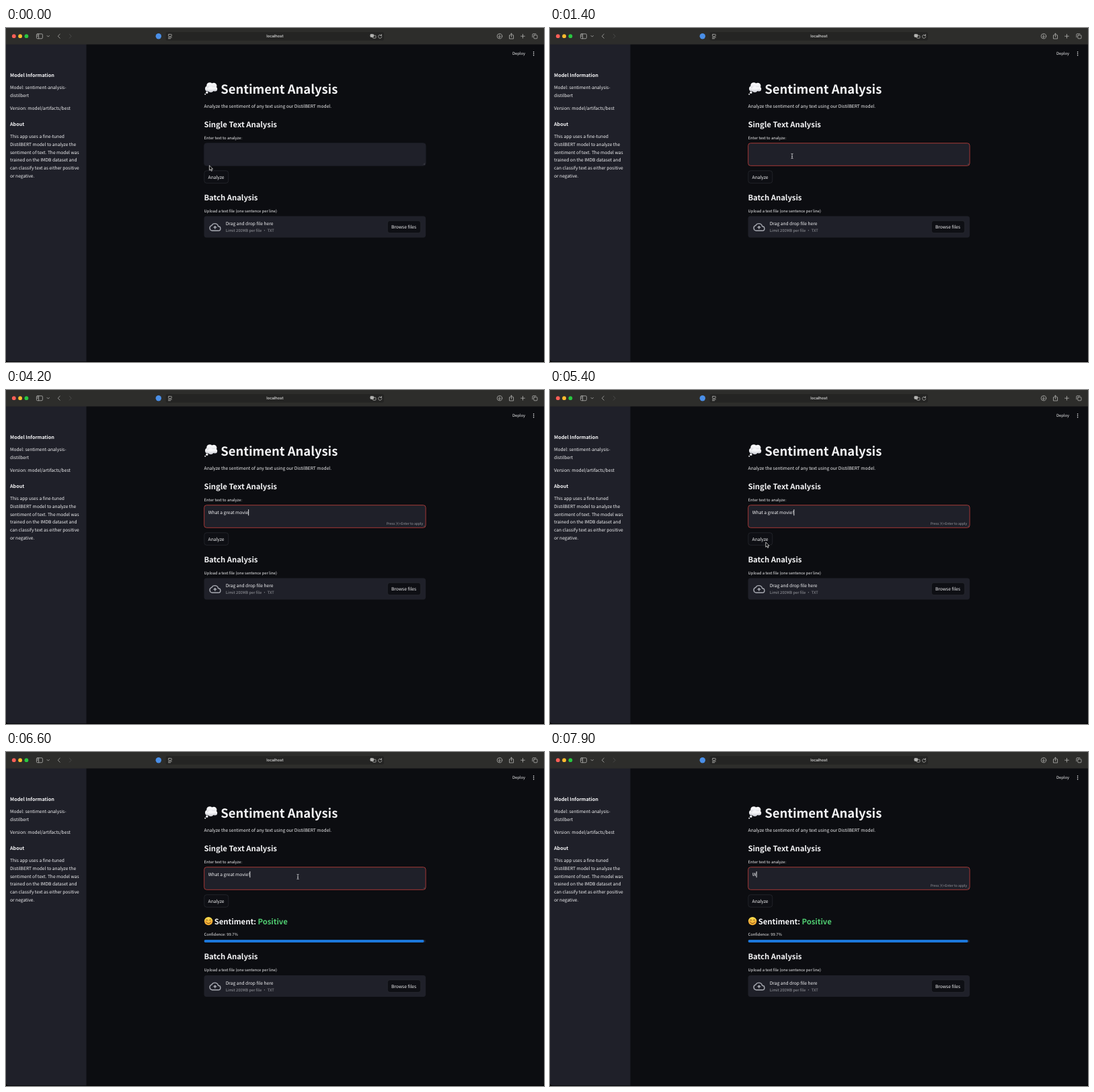
These frames come from a looping animation (800 px wide and 498 px high, 8000 ms). An HTML page:

```html
<!DOCTYPE html>
<html lang="en">
<head>
<meta charset="utf-8">
<title>Sentiment Analysis</title>
<style>
html, body { margin: 0; width: 100%; height: 100%; overflow: hidden; background: #000; }
svg { display: block; width: 800px; height: 498px; }
text {
  font: 6.66px "Noto Sans CJK SC", "Noto Sans CJK JP", "Open Sans", sans-serif;
  fill: #f4f4f6; text-rendering: geometricPrecision; white-space: pre;
}
.h1 { font-size: 18.4px; font-weight: 700; }
.h2 { font-size: 11.27px; font-weight: 600; }
.h3 { font-size: 7.2px; font-weight: 600; }
.small { font-size: 5.82px; }
.dim { fill: #9c9da3; }
.hint { font-size: 5.05px; fill: #9c9da3; text-anchor: end; }
.url { font: 500 5.8px Inter, sans-serif; fill: #e6e6e5; text-anchor: middle; }
.panel { fill: #1f2029; }
.button { fill: #0e0f14; stroke: #303138; stroke-width: .6; }
.icons { fill: none; stroke: #b4b4b2; stroke-width: .8; stroke-linecap: round; stroke-linejoin: round; }
</style>
</head>
<body>
<svg viewBox="0 0 800 498">
  <defs>
    <linearGradient id="puff" x2="0" y2="1">
      <stop offset=".4" stop-color="#f6f6f8"/><stop offset="1" stop-color="#c9cad2"/>
    </linearGradient>
    <linearGradient id="face" x2="0" y2="1">
      <stop stop-color="#fde04f"/><stop offset="1" stop-color="#f3a52c"/>
    </linearGradient>
  </defs>

  <rect width="800" height="497.3" rx="4" fill="#0c0d11"/>
  <path class="panel" d="M0 24H119.5V497.3H4Q0 497.3 0 493.3Z"/>

  <!-- browser bar -->
  <rect width="800" height="24.5" fill="#2d2d2b"/>
  <circle cx="11.8" cy="12.2" r="2.9" fill="#fe5f57"/>
  <circle cx="21.1" cy="12.2" r="2.9" fill="#fdbb2e"/>
  <circle cx="30.4" cy="12.2" r="2.9" fill="#29c840"/>
  <rect x="237.5" y="6" width="324.5" height="12.8" rx="3" fill="#242423"/>
  <circle cx="226.8" cy="12.2" r="4.2" fill="#4a8fe8"/>
  <g class="icons">
    <rect x="45.4" y="8.8" width="9" height="7" rx="1.4"/>
    <path d="M48.6 8.8V15.8M46.6 10.7H47.4M46.6 12.3H47.4M61 11.4L62.7 13.1L64.4 11.4M80.2 9.2L77.2 12.2L80.2 15.2"/>
    <path d="M94.2 9.2L97.2 12.2L94.2 15.2" stroke="#50504e"/>
    <rect x="241.5" y="9.4" width="4.8" height="3" rx=".7"/>
    <path d="M241.4 14.1H246.4M241.4 15.8H244.6"/>
    <rect x="541.9" y="9.4" width="4.7" height="4" rx=".8" fill="#b4b4b2"/>
    <rect x="545.4" y="11.2" width="4.6" height="4" rx=".8"/>
    <path d="M558.3 11.2A2.6 2.6 0 1 0 558.8 13M558.5 9.5V11.4H556.6"/>
    <circle cx="734" cy="12.2" r="3.7"/>
    <path d="M734 10.2V14M732.4 12.6L734 14.2L735.6 12.6"/>
    <path d="M750 10.8H748.5V16H754.6V10.8H753.1M751.5 13.2V8.2M749.9 9.7L751.5 8.1L753.1 9.7"/>
    <path d="M765.6 12.2H771.4M768.5 9.3V15.1"/>
    <rect x="784.8" y="10.6" width="5.2" height="5.2" rx="1"/>
    <path d="M782.9 13.8V9.7Q782.9 8.7 783.9 8.7H788"/>
  </g>
  <text class="url" x="399.8" y="14.2">localhost</text>

  <!-- sidebar -->
  <text class="h3" x="6" y="72.9">Model Information</text>
  <text class="h3" x="6" y="145.9">About</text>
  <g id="sidebar"></g>

  <!-- page -->
  <text class="small" x="753" y="40.3">Deploy</text>
  <g fill="#f4f4f6">
    <circle cx="784.6" cy="35.8" r=".8"/><circle cx="784.6" cy="38.3" r=".8"/><circle cx="784.6" cy="40.8" r=".8"/>
  </g>
  <g fill="url(#puff)">
    <circle cx="300" cy="90.5" r="4"/><circle cx="303" cy="86" r="4.8"/><circle cx="309" cy="86.2" r="4.4"/>
    <circle cx="310.6" cy="91" r="3.6"/><circle cx="304.5" cy="91.4" r="4.6"/>
    <circle cx="298.8" cy="96.2" r="1.7"/><circle cx="296.2" cy="98.8" r="1"/>
  </g>
  <text class="h1" x="319.3" y="97.9">Sentiment Analysis</text>
  <text x="294.6" y="119">Analyze the sentiment of any text using our DistilBERT model.</text>
  <text class="h2" x="294.4" y="147.6">Single Text Analysis</text>
  <text class="small" x="294.6" y="165.6">Enter text to analyze:</text>

  <rect id="box" class="panel" x="294.7" y="171.7" width="329.4" height="33.6" rx="3.6" stroke-width=".9"/>
  <path d="M620.6 203.8L622.9 201.5M622.1 203.9L623 203" stroke="#77787d" stroke-width=".4"/>
  <text id="typed" x="300.8" y="185.1"></text>
  <rect id="caret" y="178" width=".9" height="9.2" fill="#f4f4f6"/>
  <text id="hint" class="hint" x="620.2" y="201.4">Press ⌘+Enter to apply</text>

  <rect class="button" x="294.8" y="212.8" width="35.9" height="18.5" rx="3.6"/>
  <text x="300.6" y="224.5">Analyze</text>

  <g id="result">
    <circle cx="301.1" cy="252.1" r="6.2" fill="url(#face)"/>
    <g fill="#f08a3c" opacity=".6"><circle cx="297.2" cy="253.4" r="1.4"/><circle cx="305" cy="253.4" r="1.4"/></g>
    <path d="M297.4 251Q298.7 248.9 300 251M302.2 251Q303.5 248.9 304.8 251M298 254Q301.1 257.6 304.2 254"
      fill="none" stroke="#70401a" stroke-width=".9" stroke-linecap="round"/>
    <text class="h2" x="309.8" y="256.8">Sentiment: <tspan fill="#4fcb70">Positive</tspan></text>
    <text class="small" x="294.6" y="274.2">Confidence: 99.7%</text>
    <rect class="panel" x="294.6" y="280.1" width="329.5" height="3.8" rx="1.9"/>
    <rect x="294.6" y="280.1" width="327" height="3.8" rx="1.9" fill="#1c78dc"/>
  </g>

  <g id="batch">
    <text class="h2" x="294.4" y="256.8">Batch Analysis</text>
    <text class="small" x="294.6" y="274.9">Upload a text file (one sentence per line)</text>
    <rect class="panel" x="294.5" y="280.6" width="329.6" height="31.8" rx="3.6"/>
    <path d="M306.4 302.2A4 4 0 0 1 305.9 294.4A5.2 5.2 0 0 1 315.6 295.8A3.2 3.2 0 0 1 315.8 302.2Z
      M310.8 299.8V296M308.7 297.8L310.8 295.7L312.9 297.8"
      fill="none" stroke="#a9abb3" stroke-width="1.4" stroke-linejoin="round"/>
    <text x="326.7" y="294">Drag and drop file here</text>
    <text class="small dim" x="326.7" y="304.2">Limit 200MB per file • TXT</text>
    <rect class="button" x="567.3" y="287.3" width="49.4" height="18.5" rx="3.6"/>
    <text x="572.9" y="299">Browse files</text>
  </g>

  <g id="pointer">
    <path id="arrow" d="M0 0V7.2L1.7 5.7L2.9 8.3L4.1 7.8L3 5.2H5.2Z" fill="#000" stroke="#fff" stroke-width=".7"/>
    <path id="beam" d="M-1.5 -3.6Q0 -3.6 0 -2.8Q0 -3.6 1.5 -3.6M0 -2.8V2.8M-1.5 3.6Q0 3.6 0 2.8Q0 3.6 1.5 3.6M-.8 .8H.8"
      fill="none" stroke="#d8d8dc" stroke-width=".8"/>
  </g>
</svg>

<script>
const LOOP = 8000;
const MESSAGE = "What a great movie!";
const CLICK = 5500, RESULT = 5850, REFOCUS = 6500, RETYPE = 7650;

const $ = id => document.getElementById(id);
const show = (id, on) => $(id).setAttribute("visibility", on ? "inherit" : "hidden");
const between = (t, a, b) => t >= a && t < b;

const sidebarLines = [
  [91.3, "Model: sentiment-analysis-"], [103, "distilbert"], [122, "Version: model/artifacts/best"],
  ...["This app uses a fine-tuned", "DistilBERT model to analyze the", "sentiment of text. The model was",
    "trained on the IMDB dataset and", "can classify text as either positive", "or negative."]
    .map((line, i) => [164.3 + i * 11.68, line])
];
$("sidebar").innerHTML = sidebarLines.map(([y, s]) => `<text x="6" y="${y}">${s}</text>`).join("");

// pointer stops: time, x, y
const stops = [
  [300, 302.4, 205], [1100, 360, 191], [4700, 360, 191],
  [5300, 320.8, 227], [5800, 320.8, 227], [6400, 434, 186]
];

function pointerAt(t) {
  const next = stops.findIndex(s => s[0] > t);
  if (next < 1) return stops.at(next).slice(1);
  const [t0, x0, y0] = stops[next - 1], [t1, x1, y1] = stops[next];
  const p = (t - t0) / (t1 - t0), e = p * p * (3 - 2 * p);
  return [x0 + (x1 - x0) * e, y0 + (y1 - y0) * e];
}

function textAt(t) {
  if (t >= RETYPE) return "W";
  const count = Math.floor((t - 1600) / 142);
  return MESSAGE.slice(0, Math.max(0, Math.min(count, t < 4400 ? 18 : 19)));
}

function draw(now) {
  const t = now % LOOP;
  const text = textAt(t);
  const focused = between(t, 1200, CLICK) || t >= REFOCUS;
  const done = t >= RESULT;

  const typed = $("typed");
  typed.textContent = text;
  $("box").setAttribute("stroke", focused ? "#b43b39" : "#1f2029");
  $("caret").setAttribute("x", 300.8 + (text ? typed.getComputedTextLength() : 0));
  show("caret", focused && text);
  show("hint", text && (t < CLICK || t >= RETYPE));

  show("result", done);
  $("batch").setAttribute("transform", `translate(0 ${done ? 52.5 : 0})`);

  const [x, y] = pointerAt(t);
  const overBox = x > 295 && y > 172 && y < 204.5;
  $("pointer").setAttribute("transform", `translate(${x} ${y})`);
  show("pointer", !between(t, 1740, 4700) && t < RETYPE);
  show("arrow", !overBox);
  show("beam", overBox);
}

const start = performance.now();
function tick() {
  draw(performance.now() - start);
  requestAnimationFrame(tick);
}
tick();
</script>
</body>
</html>
```
